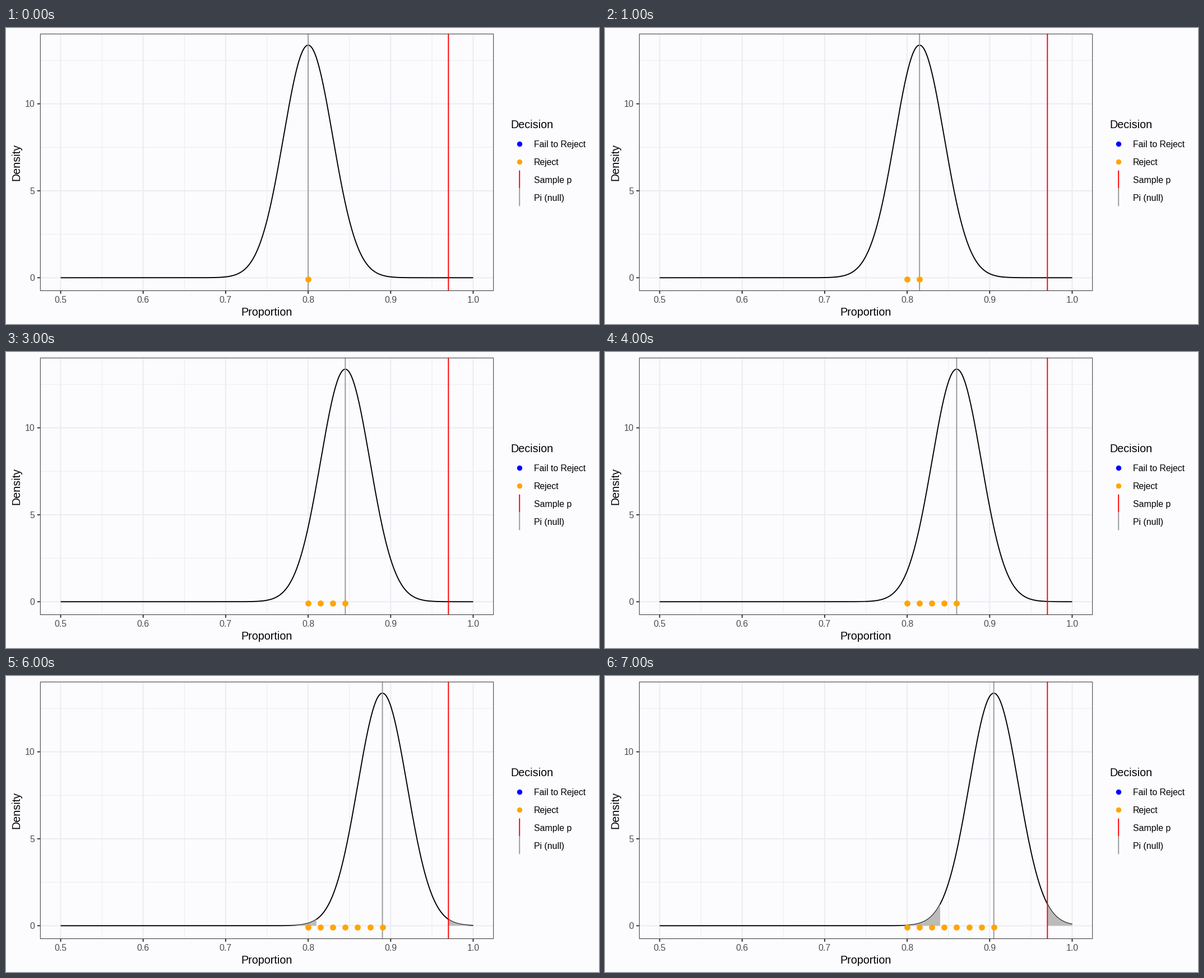
A matplotlib script that plays this animation: 1058x529 px, repeating every 8000 ms.

```python
import matplotlib.pyplot as plt
import numpy as np
from matplotlib.animation import FuncAnimation
from matplotlib.patches import Polygon, Rectangle

WIDTH, HEIGHT, DPI = 1058, 529, 100
PT = 72 / DPI  # points per pixel
LEFT, RIGHT, TOP, BOTTOM = 60.8, 870.2, 10.2, 470.0
LINE = 1.92
SAMPLE, SD, START, STEP, STEPS = 0.97, 0.02983, 0.8, 0.015, 8
BACKGROUND, GRID, DARK = "#fcfcff", "#ebebf0", "#333333"
RED, GREY, ORANGE, BLUE = "#ff0000", "#999999", "#ffa500", "#0000ff"

plt.rcParams.update({"font.family": "Liberation Sans", "path.snap": False})
fig = plt.figure(figsize=(WIDTH / DPI, HEIGHT / DPI), dpi=DPI, facecolor=BACKGROUND)
ax = fig.add_axes([0, 0, 1, 1])
ax.set(xlim=(0, WIDTH), ylim=(HEIGHT, 0))
ax.axis("off")


def px(value):
    return 97.5 + (value - 0.5) * 1472


def py(value):
    return 446.3 - value * 31.08


def density(x, mean):
    return np.exp(-0.5 * ((x - mean) / SD) ** 2) / (SD * np.sqrt(2 * np.pi))


def line(xs, ys, color, width=LINE, z=1):
    return ax.plot(xs, ys, color=color, lw=width * PT, zorder=z,
                   solid_capstyle="butt", solid_joinstyle="round")[0]


def dots(xs, ys, color, size, z=8):
    return ax.plot(xs, ys, "o", color=color, ms=size * PT, mew=0, zorder=z)[0]


def label(x, y, text, size, color="black", ha="left", **kwargs):
    ax.text(x, y, text, fontsize=size * PT, color=color, ha=ha,
            va="baseline", **kwargs)


def draw_panel():
    for value in np.arange(0.55, 1, 0.1):
        line([px(value)] * 2, [TOP, BOTTOM], GRID, LINE / 2)
    for value in (2.5, 7.5, 12.5):
        line([LEFT, RIGHT], [py(value)] * 2, GRID, LINE / 2)
    for value in np.arange(5, 11) / 10:
        x = px(value)
        line([x, x], [TOP, BOTTOM], GRID)
        line([x, x], [BOTTOM, BOTTOM + 5], DARK)
        label(x, 491.2, f"{value:.1f}", 15.85, "#4d4d4d", "center")
    for value in (0, 5, 10):
        y = py(value)
        line([LEFT, RIGHT], [y, y], GRID)
        line([LEFT - 5, LEFT], [y, y], DARK)
        label(51.6, y + 5.8, str(value), 15.85, "#4d4d4d", "right")
    ax.add_patch(Rectangle((LEFT + 0.5, TOP + 0.5), RIGHT - LEFT - 1,
                           BOTTOM - TOP - 1, fill=False, ec=DARK,
                           lw=PT, zorder=9))
    label(465.5, 514.5, "Proportion", 19.8, ha="center")
    ax.text(24.7, 240, "Density", fontsize=19.8 * PT, rotation=90,
            rotation_mode="anchor", ha="center", va="baseline")


def draw_legend():
    label(900.5, 179.2, "Decision", 19.8)
    names = ("Fail to Reject", "Reject", "Sample p", "Pi (null)")
    for row, name in enumerate(names):
        label(942, 213.1 + 31.8 * row, name, 15.85)
    dots([916.2], [207.2], BLUE, 9.4)
    dots([916.2], [239], ORANGE, 9.4)
    line([916.2] * 2, [254.6, 286.5], RED)
    line([916.2] * 2, [286.5, 318.4], GREY)


draw_panel()
draw_legend()
grid_x = np.linspace(0.5, 1, 501)
curve = line([], [], "black", z=3)
tails = [ax.add_patch(Polygon(np.zeros((3, 2)), fc="#bbbbb9", lw=0, zorder=4))
         for _ in range(2)]
null_line = line([], [], GREY, z=5)
line([px(SAMPLE)] * 2, [TOP, BOTTOM], RED, z=6)
decisions = dots([], [], ORANGE, 10.8)


def update(step):
    mean = START + STEP * step
    curve.set_data(px(grid_x), py(density(grid_x, mean)))
    for tail, (low, high) in zip(tails, ((0.5, 2 * mean - SAMPLE), (SAMPLE, 1))):
        x = np.linspace(low, high, 200)
        top = np.column_stack([px(x), py(density(x, mean))])
        tail.set_xy(np.vstack([[px(low), py(0)], top, [px(high), py(0)]]))
    null_line.set_data([px(mean)] * 2, [TOP, BOTTOM])
    tested = START + STEP * np.arange(step + 1)
    decisions.set_data(px(tested), np.full(step + 1, py(-0.1)))
    return curve, *tails, null_line, decisions


anim = FuncAnimation(fig, update, frames=STEPS, interval=1000, repeat=True)
plt.show()
```
